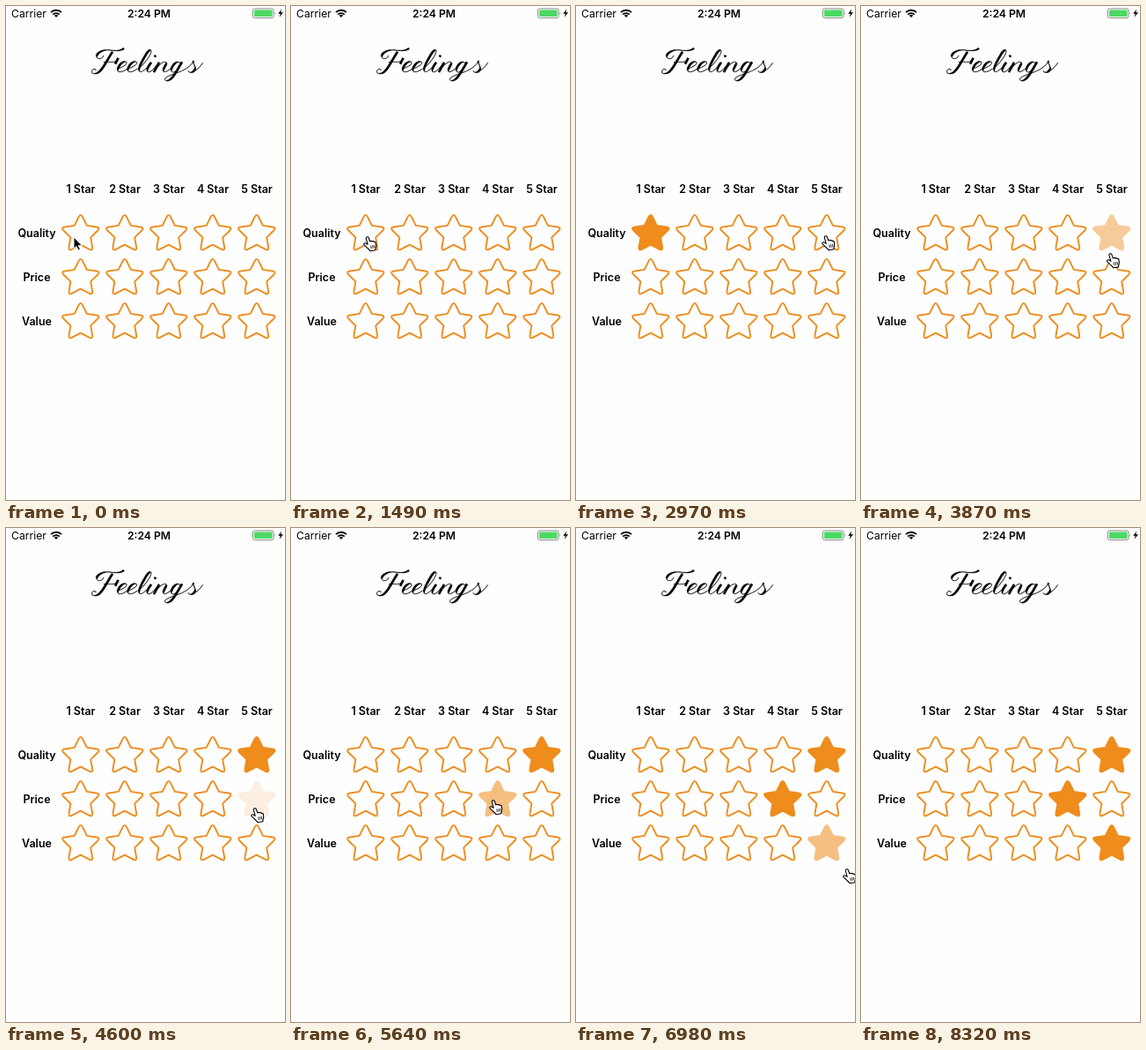
These frames come from a looping animation (317 px wide and 560 px high, 8610 ms). An HTML page:

```html
<!DOCTYPE html>
<html lang="en">
<head>
<meta charset="utf-8">
<title>Feelings</title>
<style>
html, body { margin: 0; width: 100%; height: 100%; overflow: hidden; background: #fefefe; }
svg { display: block; width: 317px; height: 560px; }
text { font: 600 12.5px Inter, "Open Sans", sans-serif; text-anchor: middle; }
#carrier { font-size: 12.2px; font-weight: 400; text-anchor: start; }
#clock { font-size: 12.2px; }
.star { stroke: #ee8c1c; stroke-width: 1.9; stroke-linejoin: round; }
</style>
</head>
<body>
<svg id="stage" viewBox="0 0 317 560">
  <text id="carrier" x="6" y="13">Carrier</text>
  <g fill="none" stroke="#000" stroke-width="1.8">
    <path d="M51 7.2a8.6 8.6 0 0 1 12 0M53.2 9.6a5.4 5.4 0 0 1 7.6 0"/>
    <path d="M57 13l-2.2-2.3a3.2 3.2 0 0 1 4.4 0z" fill="#000" stroke="none"/>
  </g>
  <text id="clock" x="162.5" y="13">2:24 PM</text>
  <rect x="280.5" y="3" width="23.500" height="10.5" rx="2" fill="none" stroke="#8a8a8a"/>
  <rect x="282" y="4.5" width="20.5" height="7.5" rx=".8" fill="#4cd964"/>
  <path d="M305 6.5q1.6 1.7 0 3.5z" fill="#8a8a8a"/>
  <path d="M313.2 3.5l-4 5.2h2.6l-1.2 4 4.4-5.4h-2.8z"/>
  <path id="title" role="img" aria-label="Feelings" stroke="#000" stroke-width=".3" stroke-linejoin="round"/>
  <g id="grid"></g>
  <path id="arrow" d="M77 262v13.2l3-2.8 2.2 4.6 2.2-1-2.1-4.4h4.2z" stroke="#fff"/>
  <g id="hand" fill="#fff" stroke="#000" stroke-linejoin="round" stroke-linecap="round">
    <path d="M3.3 2.600C3 .6 5.600 0 6.300 1.800L7.800 6C8 5 9.600 4.900 10.100 6C10.600 5.300 12 5.400 12.400 6.600C13.200 6 14.200 6.600 14.300 7.600L14.700 10.500C14.900 12 14.100 13.200 13.900 14.200V15.800L8 16.700C7.400 15 5 14 3.800 12.400L1 9.600C.2 8.400 1.600 7.200 3 8L5.200 9.300Z" stroke-width="1.1"/>
    <path d="M8.800 10.800l.4 2.800M10.700 10.500l.4 2.800M12.500 10.200l.4 2.800" stroke-width=".8"/>
  </g>
</svg>
<script>
const LOOP = 8610, STEP = LOOP / 58, FADE = 7.4;
const $ = id => document.getElementById(id);

function add(parent, tag, attrs, text = "") {
  const el = document.createElementNS("http://www.w3.org/2000/svg", tag);
  for (const k in attrs) el.setAttribute(k, attrs[k]);
  el.textContent = text;
  parent.append(el);
  return el;
}

// Pointed-pen lettering: strokes swell along the slanted downstroke.
function penStroke(d) {
  const path = document.createElementNS("http://www.w3.org/2000/svg", "path");
  path.setAttribute("d", d);
  const len = path.getTotalLength(), left = [], right = [];
  for (let s = 0; s <= len; s += 0.5) {
    const p = path.getPointAtLength(s);
    const a = path.getPointAtLength(Math.max(0, s - 0.3));
    const b = path.getPointAtLength(Math.min(len, s + 0.3));
    const l = Math.hypot(b.x - a.x, b.y - a.y) || 1;
    const dx = (b.x - a.x) / l, dy = (b.y - a.y) / l;
    const w = 0.25 + Math.max(0, 0.82 * dy - 0.57 * dx) ** 3;
    left.push([p.x - dy * w, p.y + dx * w]);
    right.unshift([p.x + dy * w, p.y - dx * w]);
  }
  return "M" + left.concat(right).map(q => q.map(v => v.toFixed(2))).join("L") + "Z";
}
const e = "c4-1 10-4 10-6.5c0-2-3-2-6 .5c-3 3-5 7-3.5 9c1.5 2 6.5 0 10.5-3";
$("title").setAttribute("d", [
  "M121 52C115 61 111 70 106 74.5C102 78 96 77 98 73C99 71 102 71 102 73",
  "M134 48C127 53 119 49 113 50C106 51 101 56 104 59C106 61 110 59 111 56",
  "M111 64C116 62 121 66 127 61", "M127.5 59L124 66",
  "M127 71" + e, "M138.5 71" + e,
  "M150 71C156 67 165 56 165 51C165 48.5 162 50 159 55C155 62 150 70 151.5 74C153 76 157 73 161 69",
  "M165 64C162 68 159.5 72 161 74.5C163 76 167 73 172 66",
  "M170 56L168.6 58",
  "M174 64L168 75", "M169 73C175 65 180 62 182 64C183 66 178 71 179 74C180 76 185 73 188 70",
  "M198 65C196 62 192 64 189.5 68C187 72 187.5 75 190 75C193 75 197 69 199 64",
  "M200 63.5C196 70 192 78 188 82C184 86 179 85 181 82C184 78 198 76 206 70",
  "M206 70C209 68 212 65 213 62C212 66 217 69 214 73C212 76 207 76 207 73",
  "M214 73.5C218 72 221 68 224 64"
].map(penStroke).join(""));

function starPath(cx, cy) {
  const at = (r, k) => [cx + r * Math.sin(k * Math.PI / 5), cy - r * Math.cos(k * Math.PI / 5)];
  const mix = (a, b) => a.map((v, i) => v + (b[i] - v) * 0.32);
  let d = "";
  for (let k = 0; k < 10; k += 2) {
    const tip = at(24, k), before = at(12, k - 1), after = at(12, k + 1);
    d += `${k ? "L" : "M"}${mix(tip, before)}Q${tip} ${mix(tip, after)}L${after}`;
  }
  return d + "Z";
}

const stars = [];
for (let col = 0; col < 5; col++)
  add($("grid"), "text", { x: 85 + 50 * col, y: 212 }, `${col + 1} Star`);
["Quality", "Price", "Value"].forEach((name, row) => {
  add($("grid"), "text", { x: 35, y: 262 + 50 * row }, name);
  for (let col = 0; col < 5; col++) {
    const el = add($("grid"), "path", { class: "star", d: starPath(84.8 + 50 * col, 258.6 + 50 * row) });
    stars.push({ el, row, col });
  }
});

// [step, row, column]
const taps = [[10.7, 0, 0], [22.6, 0, 4], [29.4, 1, 4], [34.05, 1, 3], [43.05, 2, 4]];
// [step, x, y] of the hand
const route = [
  [2, 72, 262], [4, 72, 262], [5, 70, 263], [6, 73, 263], [7, 73, 263], [10, 82, 261],
  [12.5, 84, 262], [15, 143, 267], [20, 279, 260], [24, 279, 260], [29, 278, 317],
  [31, 278, 317], [34, 225, 308], [39, 225, 308], [43, 283, 358], [45, 287, 361],
  [47, 303, 386], [52, 301, 397], [55, 268, 540], [56, 268, 540]
];
const ease = u => u * u * (3 - 2 * u);

function draw(n) {
  for (const { el, row, col } of stars) {
    const tap = taps.filter(t => t[1] === row && t[0] <= n).pop();
    const on = tap && tap[2] === col;
    el.setAttribute("fill", on ? "#ee8c1c" : "none");
    el.setAttribute("opacity", on ? ease(Math.min(1, (n - tap[0]) / FADE)) : 1);
  }
  $("arrow").style.display = n < 2 ? "" : "none";
  const i = route.findIndex(k => k[0] > n);
  $("hand").style.display = i > 0 ? "" : "none";
  if (i > 0) {
    const a = route[i - 1], b = route[i], u = ease((n - a[0]) / (b[0] - a[0]));
    $("hand").setAttribute("transform", `translate(${a[1] + (b[1] - a[1]) * u} ${a[2] + (b[2] - a[2]) * u})`);
  }
}

const start = performance.now();
function tick(now) {
  const t = Math.max(0, now - start) % LOOP;
  draw(Math.floor(t / STEP + 0.05) % 58);
  requestAnimationFrame(tick);
}
draw(0);
requestAnimationFrame(tick);
</script>
</body>
</html>
```
